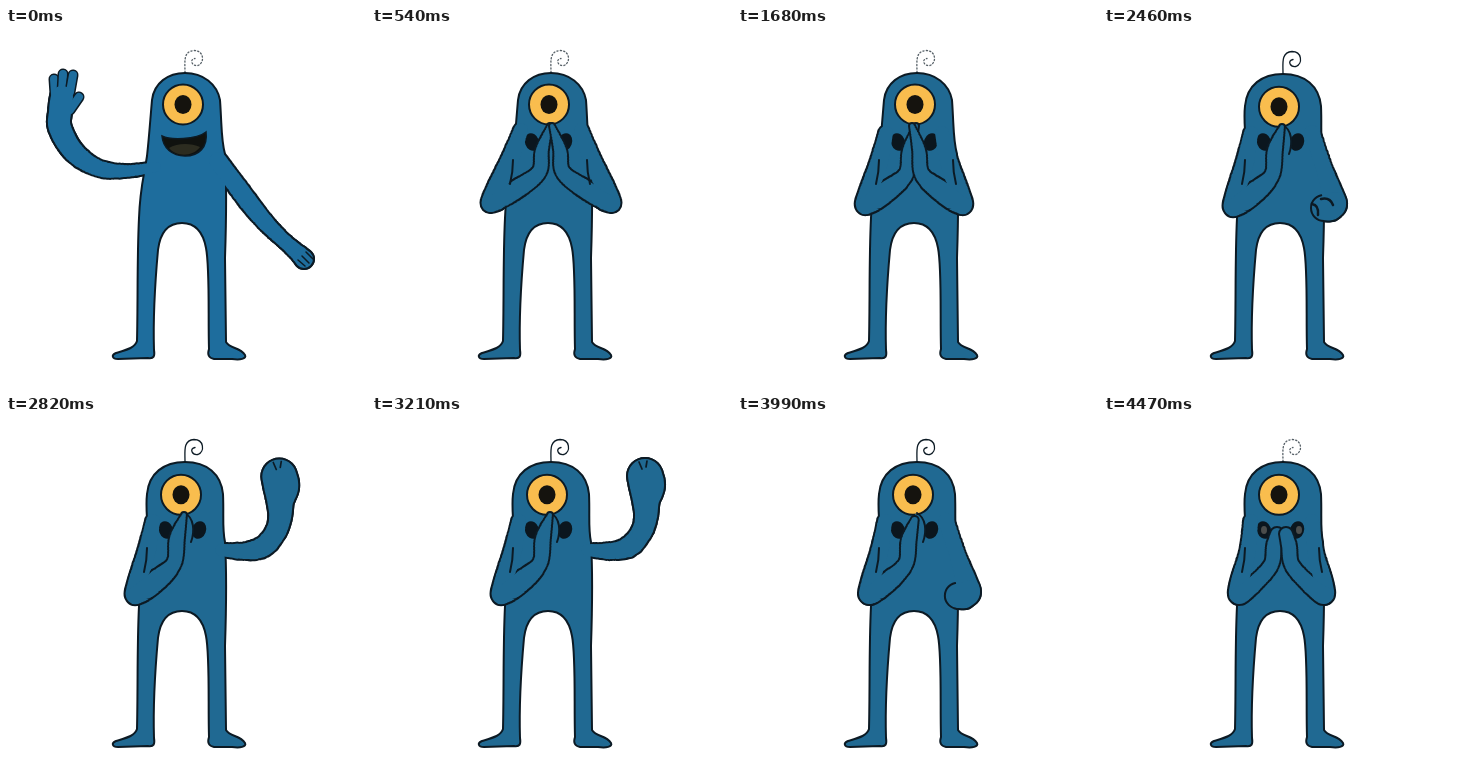
Animation of 360x360 px, one loop 4.5 s. Source, as an HTML page:

```html
<!DOCTYPE html>
<html lang="en">
<head>
<meta charset="utf-8">
<title>Waving creature</title>
<style>
html, body { margin: 0; width: 100%; height: 100%; overflow: hidden; background: #fff; }
svg { display: block; width: 100vw; height: 100vh; }
</style>
</head>
<body>
<svg id="stage" viewBox="0 0 360 360"></svg>
<script>
const LOOP = 4500, INK = '#0c1a24';
const stage = document.getElementById('stage');

function add(tag, attrs) {
  const el = document.createElementNS('http://www.w3.org/2000/svg', tag);
  set(el, attrs);
  stage.append(el);
  return el;
}
function set(el, attrs) {
  for (const k in attrs) el.setAttribute(k, attrs[k]);
}
const line = (d, w = 2) => add('path', {
  d, fill: 'none', stroke: INK, 'stroke-width': w, 'stroke-linecap': 'round', 'stroke-linejoin': 'round'
});
const show = (el, on) => set(el, { opacity: +on });
const clamp = x => Math.max(0, Math.min(1, x));
const ease = x => x * x * (3 - 2 * x);
const ramp = (t, a, b) => ease(clamp((t - a) / (b - a)));
const mix = (a, b, u) => a.map((v, i) => v + (b[i] - v) * u);
const mirror = (pose, sum) => pose.map((v, i) => i % 3 ? v : sum - v);

// Arm poses: x, y, radius for eight points from shoulder to fingertips.
const wave = [150,139,6, 120,143,7, 92,140,9, 68,124,11, 54,100,12, 54,84,12, 55,74,12, 56,69,12];
const wide = [149,102,8, 138,132,10, 123,163,10, 119,176,9, 145,161,10, 167,144,8, 170,122,7, 178,98,3];
const narrow = [148,105,8, 141,135,10, 130,165,10, 128,177,10, 149,163,11, 168,146,8, 171,122,7, 178,98,3];
const lone = [147,105,8, 141,135,10, 131,167,10, 130,179,10, 150,165,11, 168,147,8, 171,122,8, 178,99,3];
const folded = [147,105,8, 144,135,9, 136,165,10, 135,179,10, 150,168,9, 167,149,8, 170,130,8, 173,118,7];

const hang = [212,133,10, 230,157,10, 245,177,10, 260,195,9, 274,209,8, 284,218,8, 293,226,9, 298,231,10];
const low = [208,105,9, 219,138,9, 227,162,11, 231,175,12, 229,179,12, 226,180,13, 223,180,13, 220,180,13];
const out = [214,134,8, 235,142,9, 255,143,9, 272,138,10, 284,126,11, 290,112,12, 292,102,14, 293,94,16];
const up = [215,134,7, 240,135,9, 258,130,11, 270,115,11, 274,100,12, 274,84,14, 275,70,18, 273,60,18];
const bent = [215,140,6, 238,145,8, 256,147,9, 269,138,10, 268,124,11, 258,108,11, 247,93,13, 240,80,15];

const leftKeys = [[0, wave], [60, wave], [430, wide], [570, wide], [1620, narrow], [2250, narrow],
  [2460, lone], [3850, lone], [4260, folded], [LOOP, folded]];
const rightKeys = [[0, hang], [60, hang], [430, mirror(wide, 358)], [570, mirror(wide, 358)],
  [1620, mirror(narrow, 352)], [2250, mirror(narrow, 352)], [2460, low], [2700, out], [2830, up],
  [3270, up], [3570, bent], [3640, bent], [3980, low], [4260, mirror(folded, 355)], [LOOP, mirror(folded, 355)]];

function poseAt(keys, t) {
  let i = 0;
  while (i < keys.length - 2 && t >= keys[i + 1][0]) i++;
  const [a, p] = keys[i], [b, q] = keys[i + 1];
  return mix(p, q, ramp(t, a, b));
}

// Points along a smooth curve through the pose.
function sample(pose, steps = 9) {
  const pt = i => { i = Math.max(0, Math.min(7, i)) * 3; return pose.slice(i, i + 3); };
  const list = [];
  for (let i = 0; i < 7; i++) {
    const [a, b, c, d] = [pt(i - 1), pt(i), pt(i + 1), pt(i + 2)];
    for (let s = 0; s < steps; s++) {
      const u = s / steps;
      list.push(b.map((v, k) => v + u / 2 * (c[k] - a[k] +
        u * (2 * a[k] - 5 * v + 4 * c[k] - d[k] + u * (3 * (v - c[k]) + d[k] - a[k])))));
    }
  }
  list.push(pt(7));
  return list;
}
const blob = (list, grow) => list.map(([x, y, r]) => {
  r = Math.max(.5, r + grow);
  const f = n => n.toFixed(2);
  return `M${f(x - r)} ${f(y)}a${f(r)} ${f(r)} 0 1 0 ${f(2 * r)} 0a${f(r)} ${f(r)} 0 1 0 ${f(-2 * r)} 0`;
}).join('');

const backs = [0, 1].map(() => add('path', { fill: INK }));
const body = add('path', { stroke: INK, 'stroke-width': 2, 'stroke-linejoin': 'round' });
const antenna = line('M179 45C179 34 177 24 188 23C198 23 199 35 192 38C186 39 183 32 189 31', 1.3);
const smile = add('path', {
  d: 'M156 108C164 112 190 112 200 104C202 119 193 128 179 128C166 128 157 120 156 108Z',
  fill: '#10120f', stroke: INK, 'stroke-width': 1.5
});
const tongue = add('path', { d: 'M163 120C171 115 185 115 194 119C187 129 170 129 163 120Z', fill: '#2c2c20' });
const corners = [160, 193].map((x, i) => add('ellipse', {
  cx: x, cy: 114, rx: 7, ry: 9, fill: '#0b161e', transform: `rotate(${i ? 20 : -20} ${x} 114)`
}));
const glints = [160, 195].map(x => add('ellipse', { cx: x, cy: 114, rx: 3, ry: 4, fill: '#4b4d4c' }));
const eye = add('g', {});
[['circle', { r: 20, fill: '#f9bd4e', stroke: INK, 'stroke-width': 2 }],
 ['ellipse', { rx: 8.5, ry: 9.5, fill: '#15130e' }]].forEach(([tag, a]) => eye.append(add(tag, a)));
const shine = add('path', { d: 'M167 95Q179 95 187 91Q187 97 180 98L167 97Z', fill: '#fff' });
const knuckle = add('path', { d: 'M177 98C188 102 189 115 185 126L175 126', stroke: 'none' });
const knuckleEdge = line('M179 97C188 102 189 115 185 126');

function makeArm(fingers) {
  const fore = add('path', { fill: INK });
  const digits = fingers.map(f => ({ f, edge: line('', 11), skin: line('', 8) }));
  return { fore, digits, upper: add('path', {}), skin: add('path', {}) };
}
const arms = [
  makeArm([[-7, -3, -8, -18], [0, -5, 1, -23], [8, -5, 11, -22], [8, 13, 17, 0]]), makeArm([])
];
const folds = [line('M141 132Q141 144 138 156'), line('M215 132Q215 144 218 156')];
const nails = line('M2 -7L9 0M-2 -3L5 4M-6 1L1 7', 1.5);
const grip = line('M208 176Q215 177 214 187M217 171Q226 169 229 177', 2.5);
const creases = line('M-6 -14L-3 -7M2 -15L1 -9', 1.7);

const early = [146,72, 148,55, 162,45, 179,45, 197,45, 211,56, 214,72, 216,100, 215,112, 219,126];
const late = [141,78, 143,57, 158,46, 179,46, 201,46, 215,58, 217,78, 218,100, 216,112, 219,126];
function bodyPath(u) {
  const p = mix(early, late, u).map(n => n.toFixed(2));
  return `M${p.slice(0, 2)}C${p.slice(2, 8)}C${p.slice(8, 14)}C${p.slice(14)}` +
    'C221 160 220 200 219 230L220 314C224 321 234 319 239 327C241 331 234 332 226 331' +
    'L208 331C203 330 201 327 203 321C202 290 204 240 200 220C197 204 189 195 176 195' +
    'C161 195 154 206 152 222C149 255 147 290 148 322C149 328 148 331 142 330' +
    'L112 331C106 331 105 327 110 325C120 322 129 320 131 313C132 270 131 230 133 190' +
    `C134 160 138 148 141 128C143 110 ${p[0] - 2} 95 ${p[0]} ${p[1]}Z`;
}

function draw(t) {
  const k = ramp(t, 1680, 2460);
  const c = mix([30, 109, 157], [32, 105, 146], ramp(t, 0, 540)).map(Math.round);
  const skin = `rgb(${c})`;
  set(body, { d: bodyPath(k), fill: skin });
  set(eye, { transform: `translate(${177 - 2 * k} ${76.5 + 2.3 * k})` });
  const dotted = t < 2200 || t > 4250;
  set(antenna, {
    'stroke-dasharray': dotted ? '1.2 2.2' : 'none', opacity: dotted ? .7 : 1,
    transform: `translate(0 ${(k - .5).toFixed(2)})`
  });

  [leftKeys, rightKeys].forEach((keys, i) => {
    const pose = poseAt(keys, t), list = sample(pose), arm = arms[i];
    const upper = list.slice(0, 28), fore = list.slice(27);
    const [x, y] = pose.slice(-3);
    set(backs[i], { d: blob(list, 1) });
    set(arm.fore, { d: blob(fore, 1) });
    set(arm.upper, { d: blob(upper, -1), fill: skin });
    set(arm.skin, { d: blob(fore, -1), fill: skin });
    const open = 1 - ramp(t, 60, 360);
    for (const { f, edge, skin: flesh } of arm.digits) {
      const [a, b, p, q] = f.map(n => n * open);
      const d = `M${x + a} ${y + b}L${x + p} ${y + q}`;
      set(edge, { d });
      set(flesh, { d, stroke: skin });
      show(edge, open > .1);
      show(flesh, open > .1);
    }
    if (i) for (const el of [nails, creases]) set(el, { transform: `translate(${x} ${y})` });
  });

  const covered = t > 330;
  show(smile, !covered);
  show(tongue, !covered);
  corners.forEach(el => show(el, covered));
  glints.forEach(el => show(el, t > 4260));
  show(shine, t > 3520 && t < 3700);
  set(knuckle, { fill: skin });
  const gap = t > 2280 && t < 4000;
  show(knuckle, gap);
  show(knuckleEdge, gap);
  set(folds[0], { opacity: ramp(t, 340, 430) });
  set(folds[1], { opacity: t < 2400 ? ramp(t, 340, 430) : ramp(t, 4100, 4250) });
  show(nails, t < 200);
  show(grip, t > 2410 && t < 2510);
  show(creases, t > 2650 && t < 3850);
}

function tick(now) {
  draw(now % LOOP);
  requestAnimationFrame(tick);
}
draw(0);
requestAnimationFrame(tick);
</script>
</body>
</html>
```
